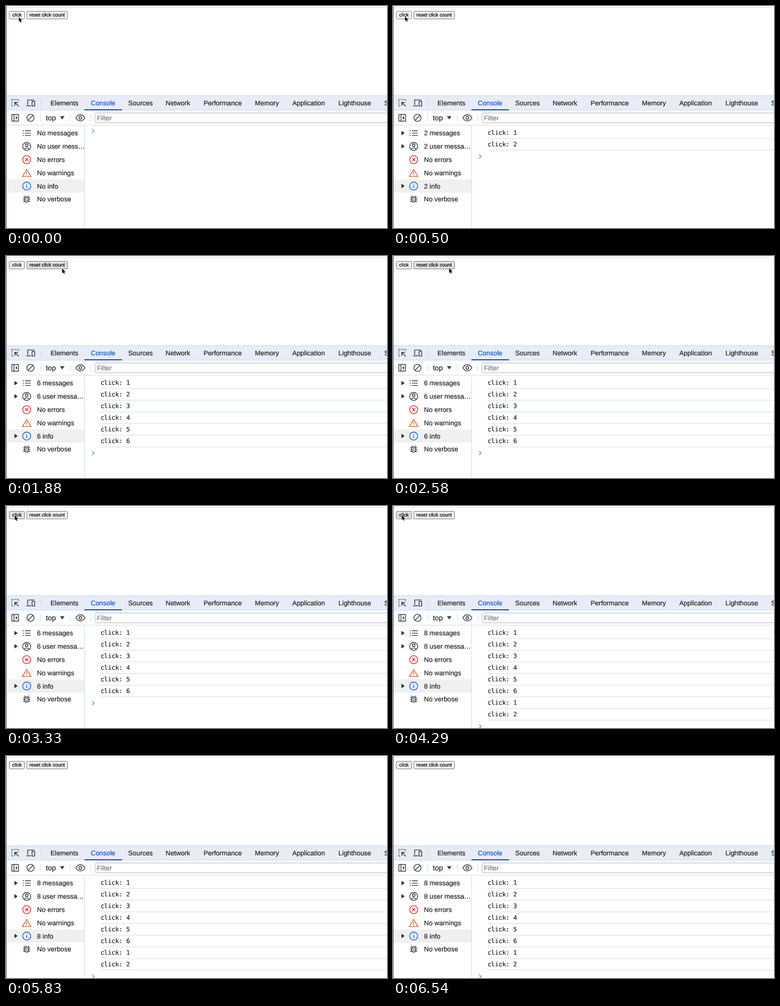
These frames come from a looping animation (685x400 px, 6.62 s). An HTML page:

```html
<!DOCTYPE html>
<html lang="en">
<head>
<meta charset="utf-8">
<title>Click counter</title>
<style>
  html, body { margin: 0; width: 100%; height: 100%; overflow: hidden; background: #fff; }
  svg { display: block; width: 685px; height: 400px; }
  text {
    font: 12px "Liberation Sans", Arial, sans-serif; white-space: pre;
    fill: currentColor; stroke: currentColor; stroke-width: .2; color: #1f1f1f;
    text-rendering: geometricPrecision;
  }
  .btn text { font-size: 8.9px; color: #000; }
  .btn rect { stroke: #707070; stroke-width: .9; }
  .log text { font: 11px "DejaVu Sans Mono", monospace; }
  .line { fill: none; stroke-width: 1.4; }
  .rule { stroke: #cbddf6; stroke-width: 1; }
</style>
</head>
<body>
<svg id="stage" viewBox="0 0 685 400">
  <rect width="685" height="400" fill="#fff"/>
  <path d="M0 2.5H685" stroke="#dfe1ea"/>

  <g class="btn">
    <rect id="clickBtn" x="6" y="9.6" width="27.4" height="13.6" rx="1.8"/>
    <text x="11" y="19.2">click</text>
    <rect id="resetBtn" x="37.3" y="9.6" width="73.3" height="13.6" rx="1.8"/>
    <text x="42" y="19.2">reset click count</text>
  </g>

  <rect y="161" width="685" height="27" fill="#e8ecf6"/>
  <path class="rule" d="M0 161.5H685M0 187.7H685M0 214.8H685M62.5 168V181M62.5 195V208M115.5 195V208M152.5 195V208"/>
  <rect x="141" y="186" width="67.5" height="2" fill="#0b57d0"/>
  <g id="tabs"></g>

  <g class="line" stroke="#3c3f43">
    <path d="M10.5 168.5H22.8V172M10.5 168.5V180.5H14" stroke-dasharray="1.6 1.5"/>
    <path d="M15.8 173.7L22.8 180.7M15.8 179.5V173.7H21.6" stroke-width="1.6"/>
    <path d="M39 178V169.4H51M36.5 179.8H45"/>
    <rect x="46.8" y="171.8" width="4.8" height="8.6" rx=".6"/>
    <rect x="10.5" y="195.5" width="12" height="12" rx=".6"/>
    <path d="M14.4 195.5V207.5"/>
    <circle cx="44" cy="201.5" r="6.4"/>
    <path d="M39.5 206L48.5 197"/>
    <path d="M125.6 201.5Q128.5 196 133.7 196T141.8 201.5Q138.9 207 133.7 207T125.6 201.5Z"/>
    <circle cx="133.7" cy="201.5" r="2.5"/>
  </g>
  <path d="M20 198.2L16.8 201.5L20 204.8ZM97 198.6H105.2L101.1 204.6Z" fill="#3c3f43"/>
  <text x="71.7" y="205.6" style="font-size:13px">top</text>
  <rect x="160" y="192.8" width="540" height="17.6" rx="3" fill="#fff" stroke="#b4b6ba"/>
  <text x="163.5" y="205.8" style="color:#757575">Filter</text>

  <rect y="312.5" width="141" height="23.8" fill="#f0f0f0"/>
  <path class="rule" d="M141.5 215V400"/>
  <g id="side"></g>

  <g class="line" stroke="#3c3f43">
    <path d="M34 224.8H44.5M34 229.1H44.5M34 233.4H44.5"/>
    <path d="M30 224.8H32M30 229.1H32M30 233.4H32"/>
    <circle cx="37.2" cy="253" r="7.2"/>
    <circle cx="37.2" cy="250.9" r="2.4"/>
    <path d="M32.2 257.8Q37.2 254 42.2 257.8"/>
    <rect x="34" y="344" width="6.4" height="9.4" rx="3.2"/>
    <path d="M34.6 343.9L33 341.9M39.8 343.9L41.4 341.9M31 345.5H34M31 348.7H34M31 352H34M40.4 345.5H43.4M40.4 348.7H43.4M40.4 352H43.4M36 347.2H38.4M36 350.3H38.4"/>
  </g>
  <g class="line" stroke="#d8362b">
    <circle cx="37.2" cy="276.8" r="7.2"/>
    <path d="M34.4 274L40 279.6M40 274L34.4 279.6"/>
  </g>
  <g class="line" stroke="#d4653a">
    <path d="M37.2 294.4L44.9 307.4H29.5Z"/>
    <path d="M37.2 299V303M37.2 304.3V305.7"/>
  </g>
  <g class="line" stroke="#1b62dc">
    <circle cx="37.2" cy="324.4" r="7.2"/>
    <path d="M37.2 323.3V328.1M37.2 320.5V321.9"/>
  </g>

  <g id="log" class="log"></g>
  <path id="prompt" class="line" d="M154.6 -3.6L158.6 0L154.6 3.6" stroke="#6a9bea"/>
  <path d="M.5 0V400" stroke="#4b5a7a"/>
  <path id="cursor" d="M0 0V8.3L1.9 6.6L3.2 9.6L4.7 9L3.4 6H6Z" fill="#000" stroke="#fff" stroke-width=".8" paint-order="stroke"/>
</svg>
<script>
const LOOP = 6620, STEP = 1000 / 24;
const el = id => document.getElementById(id);

function add(parent, tag, attrs, label = "") {
  const node = document.createElementNS("http://www.w3.org/2000/svg", tag);
  for (const key in attrs) node.setAttribute(key, attrs[key]);
  node.textContent = label;
  return parent.appendChild(node);
}

const tabs = [[80, "Elements"], [152.5, "Console"], [219.8, "Sources"], [287, "Network"],
  [355.3, "Performance"], [447.5, "Memory"], [514.7, "Application"], [597.8, "Lighthouse"], [680, "Sources"]];
for (const [x, name] of tabs)
  add(el("tabs"), "text", { x, y: 178.8, style: name === "Console" ? "color:#0b57d0" : "" }, name);

// Sidebar: text when empty, text after the count
const kinds = [["No messages", " messages"], ["No user mess…", " user messa…"], ["No errors"],
  ["No warnings"], ["No info", " info"], ["No verbose"]];
const side = kinds.map(([none, some], i) => {
  const y = 229 + 23.8 * i;
  const label = add(el("side"), "text", { x: 55.8, y: y + 4.3 }, none);
  const arrow = some && add(el("side"), "path", { d: `M15.2 ${y - 4}V${y + 4}L21 ${y}Z`, fill: "#333" });
  return { none, some, label, arrow };
});

const clicks = [100, 340, 580, 820, 1060, 1385, 3800, 4160];
const resetAt = 2280, PRESS = 100;
const rows = clicks.map((t, i) => {
  const g = add(el("log"), "g", {});
  add(g, "text", { x: 170, y: 232.2 + 21 * i }, "click: " + (i % 6 + 1));
  add(g, "path", { class: "rule", d: `M170 ${238.9 + 21 * i}H685` });
  return g;
});

const smooth = u => u * u * (3 - 2 * u), speedUp = u => u * u, even = u => u;
// time, x, y, easing towards this point
const path = [[0, 23.2, 20.2], [1000, 20, 17.2, even], [1480, 20, 17.2, even], [1840, 101, 22.8, smooth],
  [2720, 101, 22, even], [3260, 15.8, 17.4, smooth], [4450, 15.8, 16.6, even],
  [4800, 118, 124, speedUp], [5040, 273.2, 321.6, even], [5170, 273.2, 404, even]];

function pointer(t) {
  const i = path.findIndex(p => p[0] > t);
  if (i < 0) return path[path.length - 1].slice(1);
  const [t0, x0, y0] = path[i - 1], [t1, x1, y1, ease] = path[i];
  const u = ease((t - t0) / (t1 - t0));
  return [x0 + (x1 - x0) * u, y0 + (y1 - y0) * u];
}

function shade(t, x, y, left, right, times) {
  if (x < left || x > right || y > 24) return "#efefef";
  return times.some(c => t >= c - PRESS && t < c) ? "#f5f5f5" : "#e1e1e1";
}

function draw(t) {
  const count = clicks.filter(c => c <= t).length;
  const [x, y] = pointer(t);
  rows.forEach((row, i) => row.setAttribute("visibility", i < count ? "visible" : "hidden"));
  for (const s of side) {
    if (!s.some) continue;
    s.label.textContent = count ? count + s.some : s.none;
    s.arrow.setAttribute("visibility", count ? "visible" : "hidden");
  }
  el("prompt").setAttribute("transform", `translate(0 ${count ? 229.2 + 21 * count : 225.2})`);
  el("cursor").setAttribute("transform", `translate(${x} ${y})`);
  el("clickBtn").setAttribute("fill", shade(t, x, y, 6, 33.4, clicks));
  el("resetBtn").setAttribute("fill", shade(t, x, y, 37, 110.6, [resetAt]));
}

const start = performance.now();
function tick() {
  const t = Math.max(0, performance.now() - start) % LOOP;
  draw(Math.floor((t + 5) / STEP) * STEP);
  requestAnimationFrame(tick);
}
tick();
</script>
</body>
</html>
```
